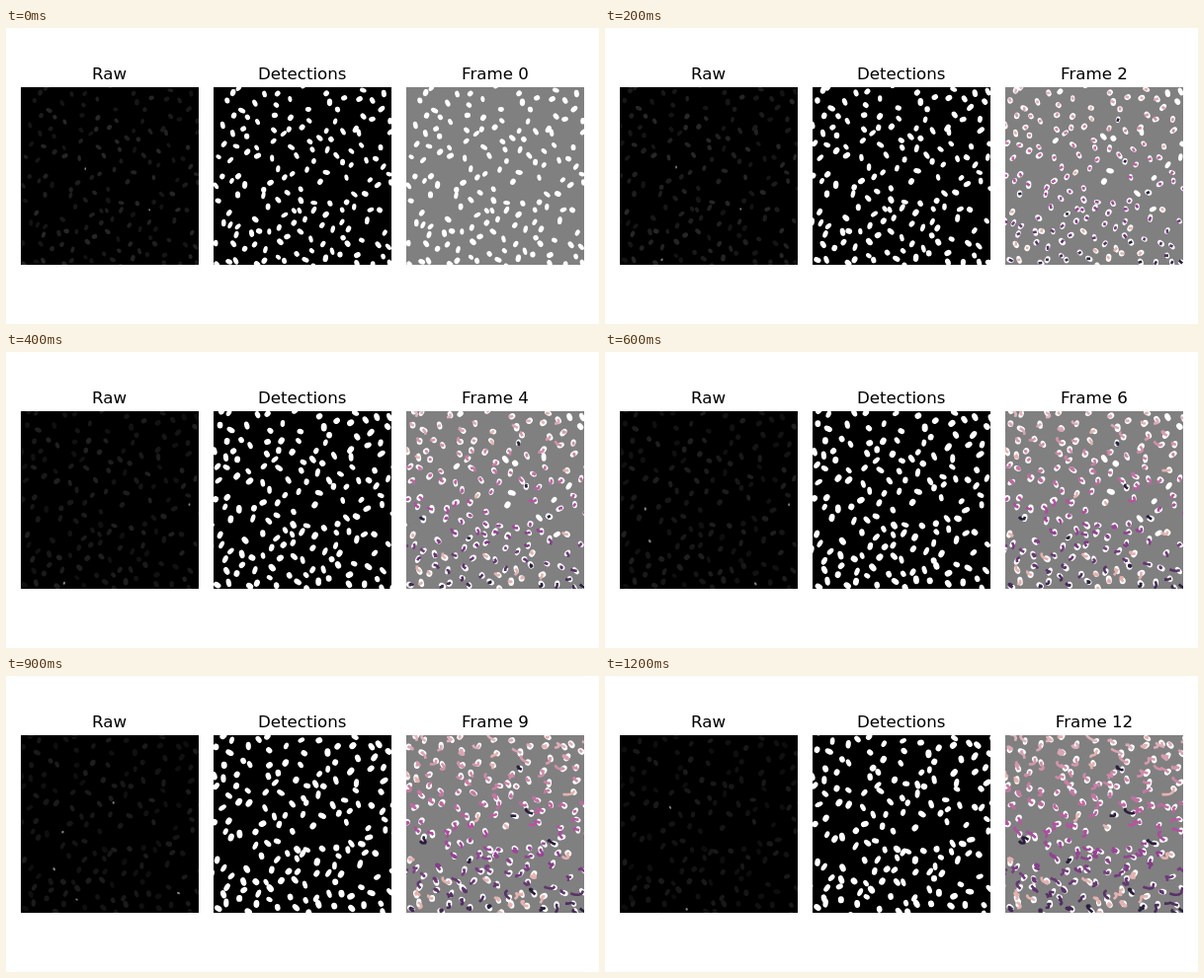
Animation, 600 px wide and 300 px high, one loop 1300 ms. Source, as an HTML page with a canvas:

```html
<!DOCTYPE html>
<html lang="en">
<head>
<meta charset="utf-8">
<title>Cell tracking</title>
<style>
  html, body { margin: 0; width: 100%; height: 100%; overflow: hidden; background: #fff; }
  canvas, svg { position: absolute; left: 0; top: 0; width: 600px; height: 300px; }
  text { font: 16.67px "DejaVu Sans", Verdana, sans-serif; text-anchor: middle; fill: #000; }
</style>
</head>
<body>
<canvas id="stage" width="600" height="300"></canvas>
<svg viewBox="0 0 600 300">
  <text x="104.5" y="52">Raw</text>
  <text x="299.7" y="52">Detections</text>
  <text x="495" y="52" id="count">Frame 0</text>
</svg>
<script>
const FRAMES = 13, STEP = 100, SIZE = 180, TOP = 60, MID = 6;
const TOTAL = 168, GAP = 9.2, JUMP = { x: 9.3, y: 1 };
const ctx = document.getElementById('stage').getContext('2d');
const count = document.getElementById('count');

// Landmark cells, including the tight cluster right of centre
const LANDMARKS = [
  [125, 115], [125, 123], [94, 116], [91, 122], [158, 71], [88, 81],
  [22, 40], [18, 107], [5, 126], [32, 133], [122, 150]
];

// Empty patches: x, y, half width, half height
const GAPS = [[28, 119, 20, 9], [30, 89, 14, 11], [120, 100, 22, 12], [172, 112, 8, 14]];

let seed = 4711;
function rand(lo = 0, hi = 1) {
  seed = (seed * 1664525 + 1013904223) % 4294967296;
  return lo + (hi - lo) * seed / 4294967296;
}

// Pale pink at the top, through mauve, to dark purple at the bottom
function shade(y) {
  const k = Math.max(0, Math.min(1, y / SIZE));
  return `hsl(${350 - 75 * k}, ${Math.round(42 - 8 * k)}%, ${Math.round(80 - 56 * k)}%)`;
}

function trackColour(y) {
  const r = rand();
  if (r < 0.07) return 'rgb(42,30,62)';
  if (r < 0.19 || (y > 160 && r < 0.45)) return 'rgb(228,178,176)';
  return shade(y);
}

function makeCell(x, y) {
  return {
    x, y,
    vx: 0.1 + 0.6 * x / SIZE + rand(-0.4, 0.4),
    vy: rand(-0.6, 0.5),
    sway: rand(0.6, 2), rate: rand(0.4, 1.1), phase: rand(0, 6.28),
    rx: rand(3.2, 4.5), ry: rand(2.3, 3.1), angle: rand(0.3, 2.7), spin: rand(-0.06, 0.06),
    glow: rand(0.45, 1),
    flash: rand() < 0.1 ? rand(0, FRAMES) : -9,
    birth: rand() < 0.1 ? Math.floor(rand(3, 9)) : 1,
    colour: trackColour(y)
  };
}

function isFree(x, y, cells) {
  return GAPS.every(([gx, gy, w, h]) => Math.hypot((x - gx) / w, (y - gy) / h) > 1)
    && cells.every(c => Math.hypot(c.x - x, c.y - y) > GAP);
}

function makeCells() {
  const cells = LANDMARKS.map(p => makeCell(...p));
  for (let tries = 0; cells.length < TOTAL && tries < 6000; tries++) {
    const x = rand(-5, SIZE + 4), y = rand(0, SIZE);
    if (isFree(x, y, cells)) cells.push(makeCell(x, y));
  }
  return cells;
}

const cells = makeCells();

function place(c, t) {
  // The view jumps once, after the first step
  const s = Math.max(t, 1), jump = t === 0 ? 1 : 0;
  return [
    c.x + c.vx * (s - MID) + c.sway * Math.sin(s * c.rate + c.phase) + JUMP.x * jump,
    c.y + c.vy * (s - MID) + c.sway * Math.cos(s * c.rate * 0.8 + c.phase) + JUMP.y * jump
  ];
}

function drawCell(c, t, scale = 1) {
  const [x, y] = place(c, t);
  const grow = scale * (0.88 + 0.12 * Math.min(1, t / 5));
  ctx.beginPath();
  ctx.ellipse(x, y, c.rx * grow, c.ry * grow, c.angle + c.spin * (t - MID), 0, Math.PI * 2);
  ctx.fill();
}

function drawTrack(c, t) {
  if (t <= c.birth) return;
  ctx.strokeStyle = c.colour;
  ctx.beginPath();
  for (let s = c.birth; s <= t; s++) ctx.lineTo(...place(c, s));
  ctx.stroke();
}

function panel(left, back, paint) {
  ctx.save();
  ctx.translate(left, TOP);
  ctx.beginPath();
  ctx.rect(0, 0, SIZE, SIZE);
  ctx.clip();
  ctx.fillStyle = back;
  ctx.fillRect(0, 0, SIZE, SIZE);
  paint();
  ctx.restore();
}

function whiteCells(t) {
  ctx.fillStyle = '#fff';
  for (const c of cells) drawCell(c, t);
}

function rawCells(t) {
  const level = t < 3 ? 40 : 36 - t * 0.8;
  for (const c of cells) {
    const lit = Math.abs(t - c.flash) < 2;
    const g = lit ? 125 : Math.round(level * c.glow);
    ctx.fillStyle = `rgb(${g},${g},${g})`;
    drawCell(c, t, lit ? 0.4 : 0.85);
  }
}

function tracks(t) {
  whiteCells(t);
  ctx.lineWidth = 2.6;
  ctx.lineJoin = 'round';
  ctx.lineCap = 'square';
  for (const c of cells) drawTrack(c, t);
}

function draw(t) {
  ctx.clearRect(0, 0, 600, 300);
  panel(15, '#000', () => rawCells(t));
  panel(210, '#000', () => whiteCells(t));
  panel(405, '#808080', () => tracks(t));
  count.textContent = 'Frame ' + t;
}

let shown = -1;
function tick() {
  const t = Math.floor(performance.now() / STEP) % FRAMES;
  if (t !== shown) draw(shown = t);
  requestAnimationFrame(tick);
}
tick();
</script>
</body>
</html>
```
